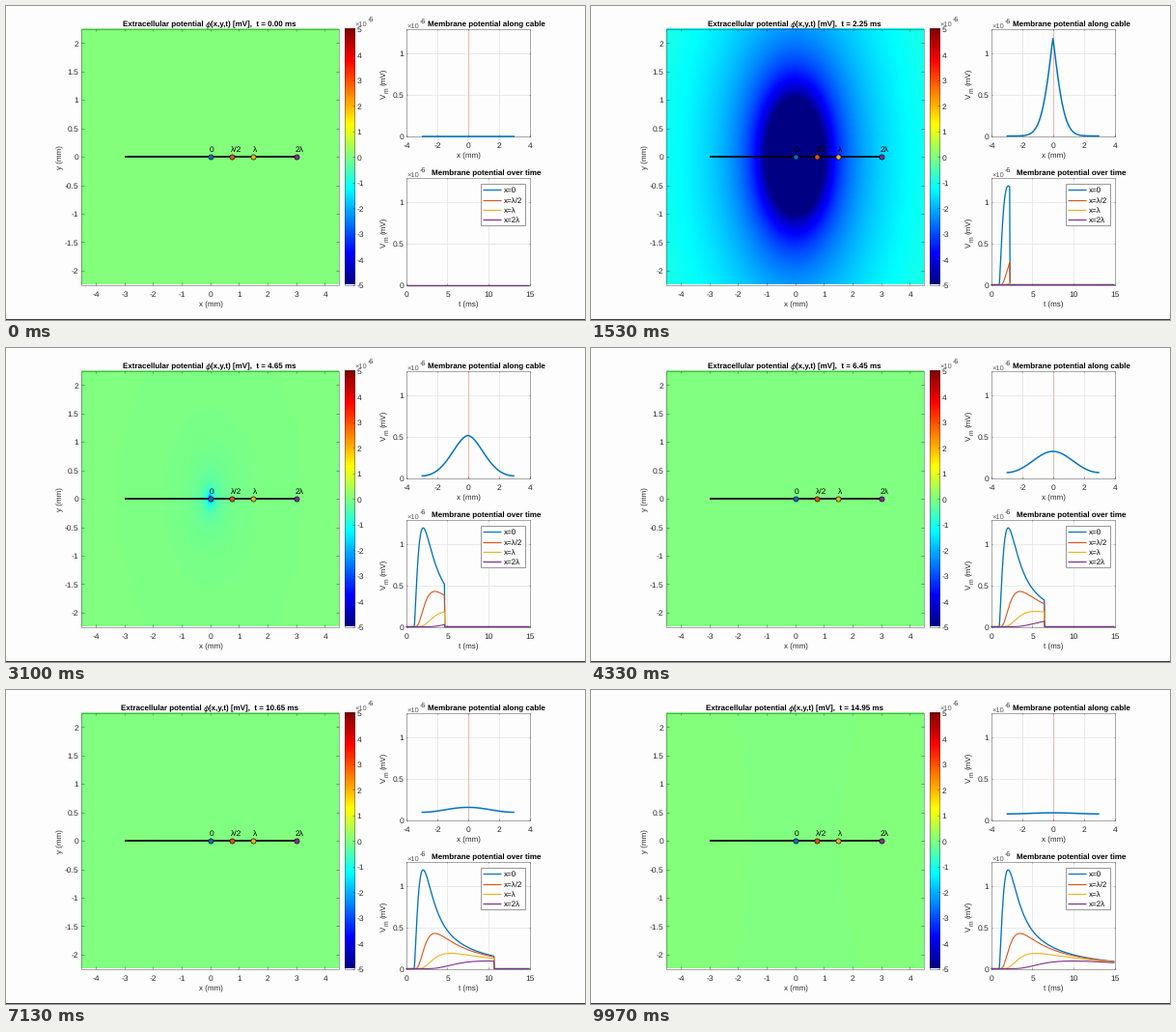
Animation, 600 px wide and 325 px high, one loop 10 s. Source, as a matplotlib script:

```python
import numpy as np
import matplotlib.pyplot as plt
from matplotlib.animation import FuncAnimation
from matplotlib.collections import LineCollection
from matplotlib.patches import Rectangle

W, H, DPI = 600, 325, 100
FRAMES, LOOP_MS = 300, 10000
PT = 72 / DPI  # points per pixel

DT, ONSET = 0.05, 0.98
TAU_SYN, TAU_MEM = 0.5, 10.0   # ms
LAM, HALF = 1.5, 3.0           # length constant and half cable, mm

BLUE, RED, YELLOW, PURPLE = "#0072BD", "#D95319", "#EDB120", "#7E2F8E"
COLORS = [BLUE, RED, YELLOW, PURPLE]
NAMES = ["0", "λ/2", "λ", "2λ"]
PROBES = np.array([0, 0.5, 1, 2]) * LAM
PAPER, INK, GRID = "#fdfdfd", "#262626", "#e6e6e6"
TICK_SIZE = 8.5

plt.rcParams.update({
    "font.family": ["Liberation Sans", "DejaVu Sans"],
    "text.hinting": "none",
})


# ---- cable model: sealed ends, alpha-shaped synaptic current at x = 0 ----
K = np.arange(80)
WAVE = K * np.pi / HALF
RATE = (1 + (LAM * WAVE) ** 2) / TAU_MEM
WEIGHT = np.where(K == 0, 0.5, 1.0) / HALF


def modes(t):
    """Mode amplitudes, one row per time."""
    s = np.maximum(np.atleast_1d(t) - ONSET, 0)[:, None]
    b = 1 / TAU_SYN
    d = b - RATE
    return WEIGHT * b**2 * (np.exp(-RATE * s) - np.exp(-b * s) * (1 + d * s)) / d**2


def shape(x):
    return np.cos(np.outer(WAVE, x))


times = np.arange(FRAMES) * DT
amps = modes(times)
amps *= 1.2 / (amps @ shape([0.0])).max()
xs = np.linspace(-HALF, HALF, 121)
v_cable = amps @ shape(xs)
v_probe = amps @ shape(PROBES)


# ---- extracellular field, in units of 1e-6 mV ----
def jet_table():
    v = 4 * np.arange(1, 257) / 256
    rgb = [np.clip(1.5 - np.abs(v - c), 0, 1) for c in (3, 2, 1)]
    return np.round(255 * np.array(rgb).T).astype(np.uint8)


JET = jet_table()
NX, NY = 267, 265
gx = (np.arange(NX) + 0.5) / NX * 9 - 4.5
gy = 2.25 - (np.arange(NY) + 0.5) / NY * 4.5
GX, GY = np.meshgrid(gx, gy)
INV_R = 1 / np.maximum(np.hypot(GX, GY), 0.03)
SPREAD = np.zeros_like(GX)
for s in xs:
    SPREAD += np.cos(np.pi * s / HALF) / np.hypot(GX - s, np.abs(GY) + 0.03)
SPREAD *= xs[1] - xs[0]


def field(i):
    u = max(times[i] - ONSET, 0) / TAU_SYN
    phi = -25.7 * u * np.exp(-u) * INV_R - 1e-5 * amps[i, 1] * SPREAD
    level = np.clip(np.floor((phi + 5) * 25.6), 0, 255).astype(int)
    return JET[level]


# ---- stage in pixel coordinates ----
fig = plt.figure(figsize=(W / DPI, H / DPI), dpi=DPI, facecolor=PAPER)
ax = fig.add_axes([0, 0, 1, 1])
ax.axis("off")


def text(x, y, s, ha="center", size=8, **kw):
    kw.setdefault("va", "baseline")
    kw.setdefault("color", INK)
    return ax.text(x, y, s, ha=ha, fontsize=size * PT, **kw)


def segments(segs, color, z, alpha=1.0):
    ax.add_collection(LineCollection(segs, colors=color, linewidths=0.8 * PT,
                                     alpha=alpha, zorder=z), autolim=False)


def line(x, y, color, width, z):
    return ax.plot(x, y, color=color, lw=width * PT, zorder=z,
                   solid_capstyle="butt", solid_joinstyle="round")[0]


def exponent(x, y):
    text(x, y, "×10", "left", 7.5, color="#555555")
    text(x + 14, y - 5, "-6", "left", 7)


class Panel:
    """Maps data to a pixel box and draws its frame."""

    def __init__(self, box, xlim, ylim):
        self.box, self.xlim, self.ylim = box, xlim, ylim

    def x(self, v):
        l, _, r, _ = self.box
        a, b = self.xlim
        return l + (np.asarray(v) - a) / (b - a) * (r - l)

    def y(self, v):
        _, t, _, b = self.box
        lo, hi = self.ylim
        return b - (np.asarray(v) - lo) / (hi - lo) * (b - t)

    def frame(self, xticks, yticks, tick):
        l, t, r, b = self.box
        segs = [[(l, t), (r, t), (r, b), (l, b), (l, t)]]
        for v in xticks:
            px = float(self.x(v))
            segs += [[(px, b), (px, b - tick)], [(px, t), (px, t + tick)]]
            text(px + 0.5, b + 12.5, f"{v:g}", size=TICK_SIZE)
        for v in yticks:
            py = float(self.y(v))
            segs += [[(l, py), (l + tick, py)], [(r, py), (r - tick, py)]]
            text(l - 2.5, py + 3.2, f"{v:g}", "right", TICK_SIZE)
        segments(segs, INK, 4, 0.5)

    def grid(self, xticks, yticks):
        l, t, r, b = self.box
        segs = [[(self.x(v), t), (self.x(v), b)] for v in xticks]
        segs += [[(l, self.y(v)), (r, self.y(v))] for v in yticks]
        segments(segs, GRID, 1)


# field panel
main = Panel((78, 23.7, 345, 288.5), (-4.5, 4.5), (-2.25, 2.25))
image = ax.imshow(field(0), extent=(78, 345, 288.5, 23.7), aspect="auto",
                  interpolation="nearest", zorder=2)
main.frame(range(-4, 5), np.arange(-2, 2.1, 0.5), 2.6)
text(212, 311.3, "x (mm)")
text(56, 157, "y (mm)", rotation=90, va="center")
line(main.x([-HALF, HALF]), main.y([0, 0]), "black", 1.7, 5)
for px, color, name in zip(main.x(PROBES), COLORS, NAMES):
    ax.plot([px], [main.y(0)], "o", ms=5.2 * PT, mfc=color, mec="black",
            mew=0.6 * PT, zorder=6)
    text(px - 0.5, 150.8, name, "left", TICK_SIZE, color="black", zorder=7)

title = [
    text(121, 21.5, "Extracellular potential", "left", weight="bold", color="black"),
    text(206.8, 21.5, "ϕ", "left", family="DejaVu Sans", style="italic", color="black"),
    text(212, 21.5, "", "left", weight="bold", color="black"),
]
TITLE_X = (121, 206.8, 212)

# colour bar
left, right = 350.5, 361
ax.imshow(JET[::-1][:, None], extent=(left, right, 288.5, 23.7), aspect="auto",
          interpolation="nearest", zorder=2)
bar = [[(left, 23.7), (right, 23.7), (right, 288.5), (left, 288.5), (left, 23.7)]]
for v in range(-5, 6):
    py = 156.1 - v * 26.48
    bar.append([(right, py), (right - 2.5, py)])
    text(363.7, py + 3.5, f"{v}", "left", TICK_SIZE)
segments(bar, INK, 4, 0.5)
exponent(361, 20.5)

# membrane potential along the cable
along = Panel((414.6, 23.7, 542.8, 134.5), (-4, 4), (0, 1.3))
along.grid((-2, 0, 2), (0.5, 1))
along.frame((-4, -2, 0, 2, 4), (0, 0.5, 1), 1.3)
exponent(415, 22.5)
text(498, 21.5, "Membrane potential along cable", weight="bold", color="black")
text(479.5, 157.7, "x (mm)")
line(along.x([0, 0]), (23.7, 134.5), "#eeb3a9", 0.9, 3)
cable_line = line(along.x(xs), along.y(0 * xs), BLUE, 1.5, 5)

# membrane potential over time
over = Panel((414.6, 177.7, 542.8, 288.5), (0, 15), (0, 1.3))
over.grid((5, 10), (0.5, 1))
over.frame((0, 5, 10, 15), (0, 0.5, 1), 1.3)
exponent(415, 177)
text(497.5, 175.5, "Membrane potential over time", weight="bold", color="black")
text(479.5, 311.3, "t (ms)")
for start in (95.5, 249.5):
    for dx, dy, s, size in ((0, 0, "V", 8), (2.5, 5.8, "m", 6.8), (0, 13.6, "(mV)", 8)):
        text(394 + dx, start - dy, s, "left", size, rotation=90,
             rotation_mode="anchor")
widths = (1.3, 1.1, 1.1, 1.1)
traces = [line(over.x(times), over.y(0 * times), c, w, 5)
          for c, w in zip(COLORS, widths)]

ax.add_patch(Rectangle((491.5, 183.7), 46, 43, fc="white", ec="#808080",
                       lw=0.8 * PT, zorder=8))
for row, (color, name) in enumerate(zip(COLORS, NAMES)):
    py = 190.1 + 10.4 * row
    line((493.5, 513), (py, py), color, 1.2, 9)
    text(516, py + 3, "x=" + name, "left", color="black", zorder=9)

# dark bottom edge of the stage
ax.add_patch(Rectangle((0, H - 1), W, 1, fc="#404040", lw=0, zorder=10))

ax.set_xlim(0, W)
ax.set_ylim(H, 0)


def update(i):
    t = times[i]
    image.set_data(field(i))
    shift = 2.2 if t > 9.99 else 0
    for part, x in zip(title, TITLE_X):
        part.set_x(x - shift)
    title[2].set_text(f"(x,y,t) [mV],  t = {t:.2f} ms")
    cable_line.set_ydata(along.y(v_cable[i]))
    past = np.arange(FRAMES) <= i
    for trace, v in zip(traces, v_probe.T):
        trace.set_ydata(over.y(np.where(past, v, 0)))
    return [image, cable_line, *title, *traces]


anim = FuncAnimation(fig, update, frames=FRAMES, interval=LOOP_MS / FRAMES,
                     repeat=True, repeat_delay=0, blit=False)
plt.show()
```
